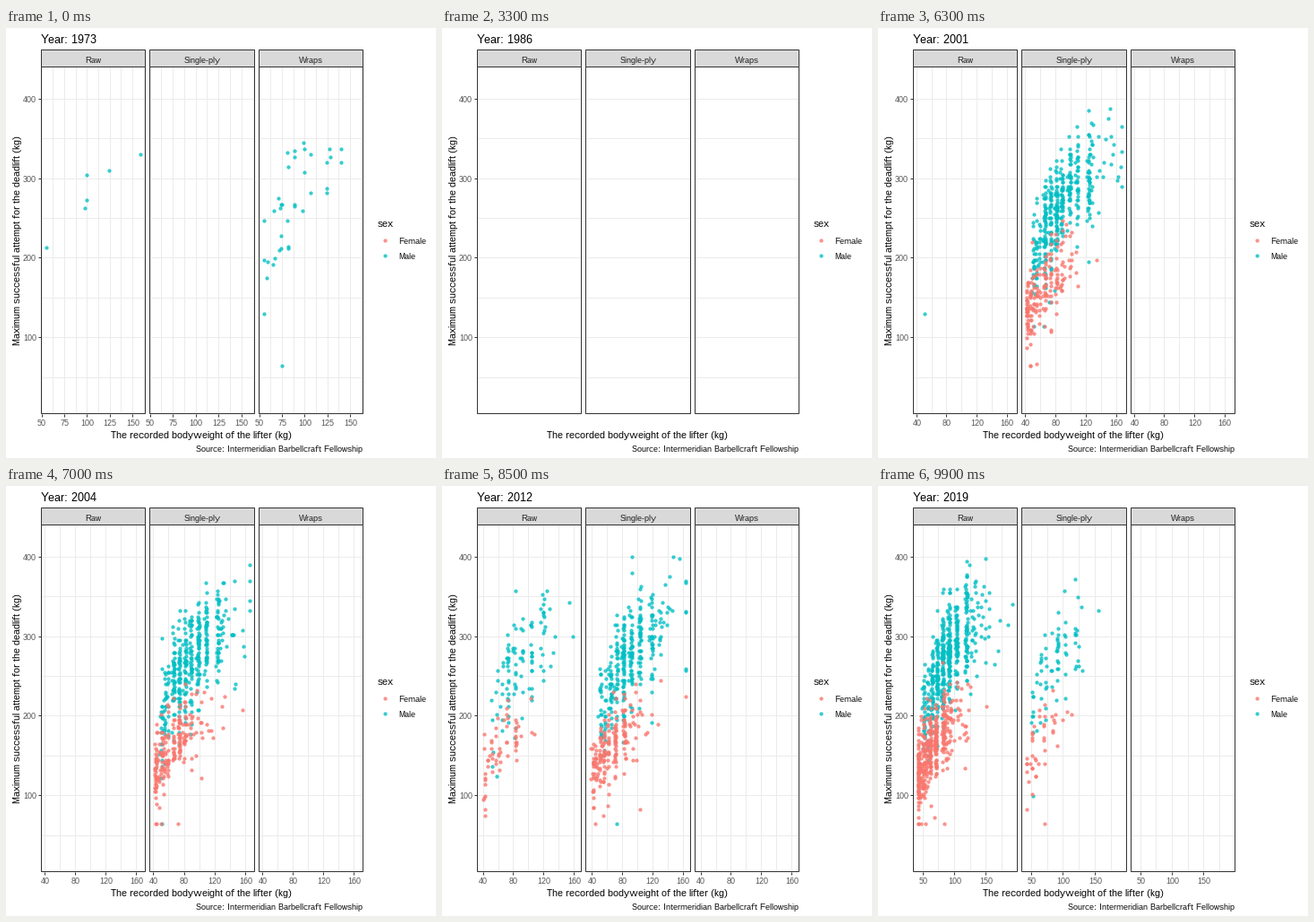
Recreate the animation shown at these times as a matplotlib script. Size 480 by 480 pixels, loop 10000 ms.

```python
import numpy as np
import matplotlib.pyplot as plt
from matplotlib.animation import FuncAnimation
from matplotlib.colors import to_rgba
from matplotlib.patches import Rectangle

plt.rcParams.update({
    "font.family": "Liberation Sans",
    "text.hinting": "default",
    "text.hinting_factor": 1,
    "toolbar": "None",
})

SIZE, DPI = 480, 72
FRAMES, INTERVAL = 100, 100
TOP, BOTTOM = 43, 430
PANELS = [("Raw", 39, 155), ("Single-ply", 160, 277), ("Wraps", 282, 398)]
RAW, SINGLE, WRAPS = range(3)
COLORS = {"M": "#00BFC4", "F": "#F8766D"}
GRID, DARK, GREY = "#EBEBEB", "#333333", "#4D4D4D"

# Upper limits of the weight classes, before and after the 2011 reform.
CLASSIC = [44, 48, 52, 56, 60, 67.5, 75, 82.5, 90, 100, 110, 125]
OLD = {"M": CLASSIC[2:], "F": CLASSIC[:9]}
NEW = {"M": [53, 59, 66, 74, 83, 93, 105, 120],
       "F": [43, 47, 52, 57, 63, 72, 84]}

# Lightest and heaviest lifter at some years, interpolated between.
KEY_YEARS = [1973, 1977, 1994, 2001, 2008, 2012, 2019]
LIGHTEST = [55, 52.5, 43.6, 42.1, 40.9, 38.6, 42.5]
HEAVIEST = [159, 149, 174.1, 167.4, 165, 163.8, 192.3]


def counts(year):
    """Lifters per (panel, sex) in a year."""
    if year in (1973, 1976, 1977, 1978):
        return {(RAW, "M"): 4, (WRAPS, "M"): 38}
    if year < 1993:
        return {}
    if year < 2012:
        k = (year - 1993) / 18
        return {(SINGLE, "M"): int(360 + 60 * np.sin(np.pi * k)),
                (SINGLE, "F"): int(150 + 85 * k)}
    k = (year - 2012) / 7
    return {(RAW, "M"): int(105 + 430 * k), (RAW, "F"): int(58 + 362 * k),
            (SINGLE, "M"): int(330 - 255 * k), (SINGLE, "F"): int(195 - 152 * k)}


def typical_lift(sex, bw):
    best, scale = (355, 60) if sex == "M" else (225, 50)
    return best * (1 - np.exp(-bw / scale))


def crowd(rng, sex, n, year, span):
    """Bodyweights bunch just under the class limits; the top class is open."""
    limits = np.array((NEW if year > 2010 else OLD)[sex] + [np.inf])
    mid, spread = (84, 0.28) if sex == "M" else (60, 0.3)
    wish = mid * np.exp(rng.normal(0, spread, n))
    limit = limits[np.searchsorted(limits, wish)]
    under = limit - np.minimum(rng.exponential(1.1, n), 4)
    bw = np.clip(np.where(np.isinf(limit), wish, under), *span)

    lift = typical_lift(sex, bw) + rng.normal(0, 32 if sex == "M" else 24, n)
    lift -= rng.exponential(60, n) * (rng.random(n) < 0.03)
    return bw, np.clip(np.round(lift / 2.5) * 2.5, 65, 400)


def make_year(year):
    """Return the bodyweight span and the points per (panel, sex)."""
    groups = counts(year)
    if not groups:
        return None, {}
    rng = np.random.default_rng(year)
    span = [np.interp(year, KEY_YEARS, ends) for ends in (LIGHTEST, HEAVIEST)]
    data = {(p, sex): crowd(rng, sex, n, year, span)
            for (p, sex), n in groups.items()}
    # The lightest and the heaviest lifter set the width of the axis.
    main = SINGLE if 1980 < year < 2016 else RAW
    light = "F" if (main, "F") in data else "M"
    for sex, bw in ((light, span[0]), ("M", span[1])):
        xs, ys = data[main, sex]
        data[main, sex] = np.append(xs, bw), np.append(ys, typical_lift(sex, bw))
    if 1993 <= year < 2003:
        data[RAW, "M"] = [51], [130]
    return span, data


YEARS = {y: make_year(y) for y in range(1973, 2020)}


def y_px(lift):
    return 434.8 - 0.8893 * np.asarray(lift, float)


def x_px(bw, view, left, right):
    k = (np.asarray(bw, float) - view[0]) / (view[1] - view[0])
    return left + 0.3 + k * (right - left)


def tick_step(width):
    for limit, step in ((70, 20), (115, 25), (128, 40), (140, 30)):
        if width < limit:
            return step
    return 50


def multiples(step, view):
    return np.arange(np.ceil(view[0] / step), np.floor(view[1] / step) + 1) * step


fig = plt.figure(figsize=(SIZE / DPI, SIZE / DPI), dpi=DPI, facecolor="white")
ax = fig.add_axes([0, 0, 1, 1])
ax.set_xlim(0, SIZE)
ax.set_ylim(SIZE, 0)
ax.axis("off")


def text(x, y, s, size=9, color="black", ha="left", **kw):
    return ax.text(x, y, s, fontsize=size, color=color, ha=ha, va="baseline",
                   **kw)


def stroke(xs, ys, color, z):
    return ax.plot(xs, ys, color=color, lw=1, snap=True, zorder=z,
                   solid_capstyle="butt")[0]


def uprights(line, xs, lo, hi):
    """Turn a line into separate vertical strokes."""
    line.set_data(np.repeat(np.round(xs), 3), np.tile([lo, hi, np.nan], len(xs)))


def dots(xs, ys, sex, z):
    rgba = to_rgba(COLORS[sex], 0.7)
    return ax.plot(xs, ys, "o", ms=3.2, mfc=rgba, mec=rgba, mew=1.1,
                   zorder=z)[0]


def box(x0, y0, x1, y1, fill):
    ax.add_patch(Rectangle((x0, y0), x1 - x0, y1 - y0, fc=fill, ec=DARK, lw=1,
                           snap=True, zorder=6))


title = text(39, 17, "", 13)
text(218, 458, "The recorded bodyweight of the lifter (kg)", 11, ha="center")
text(16, 237.5, "Maximum successful attempt for the deadlift (kg)", 11,
     ha="center", rotation=90, rotation_mode="anchor")
text(398, 473, "Source: Intermeridian Barbellcraft Fellowship", ha="right")

text(415, 222, "sex", 11)
for name, sex, y in (("Female", "F", 236.5), ("Male", "M", 253.5)):
    dots([423], [y], sex, 3)
    text(438, y + 4.5, name)

for lift in range(100, 401, 100):
    y = np.floor(y_px(lift))
    stroke([36, 39], [y, y], DARK, 2)
    text(34, y + 4, str(lift), color=GREY, ha="right")

grids, ticks, labels, points = [], [], [], {}
for p, (name, left, right) in enumerate(PANELS):
    for lift in range(50, 401, 50):
        y = np.floor(y_px(lift))
        stroke([left, right], [y, y], GRID, 1)
    box(left, TOP, right, BOTTOM, "none")
    box(left, 24, right, TOP, "#D9D9D9")
    text((left + right + 1) / 2, 39, name, color="#1A1A1A", ha="center",
         zorder=7)
    grids.append(stroke([], [], GRID, 1))
    ticks.append(stroke([], [], DARK, 2))
    labels.append([text(0, 444, "", color=GREY, ha="center")
                   for _ in range(8)])
    for z, sex in ((3, "M"), (4, "F")):
        points[p, sex] = dots([], [], sex, z)


def draw_panel(p, span, data):
    _, left, right = PANELS[p]
    major = minor = at = []
    if span:
        width = span[1] - span[0]
        view = span[0] - 0.05 * width, span[1] + 0.05 * width
        step = tick_step(width)
        major = multiples(step, view)
        at = x_px(major, view, left, right)
        minor = x_px(multiples(step / 2, view), view, left, right)
    uprights(grids[p], minor, TOP, BOTTOM)
    uprights(ticks[p], at, BOTTOM + 1, BOTTOM + 4)
    for i, label in enumerate(labels[p]):
        label.set_text(f"{major[i]:.0f}" if i < len(major) else "")
        label.set_x(at[i] + 0.5 if i < len(major) else 0)
    for sex in "MF":
        if (p, sex) in data:
            bw, lift = data[p, sex]
            points[p, sex].set_data(x_px(bw, view, left, right), y_px(lift))
        else:
            points[p, sex].set_data([], [])


def update(i):
    # Three frames per year until 1980, then two. The points switch at the
    # nearest year, the title only once a year is reached.
    start, first, per_year = (1973, 0, 3) if i < 21 else (1980, 21, 2)
    title.set_text(f"Year: {start + (i - first) // per_year}")
    span, data = YEARS[start + (i - first + 1) // per_year]
    for p in range(len(PANELS)):
        draw_panel(p, span, data)
    return []


anim = FuncAnimation(fig, update, frames=FRAMES, interval=INTERVAL,
                     init_func=lambda: update(0), repeat=True, repeat_delay=0,
                     blit=False)
plt.show()
```
